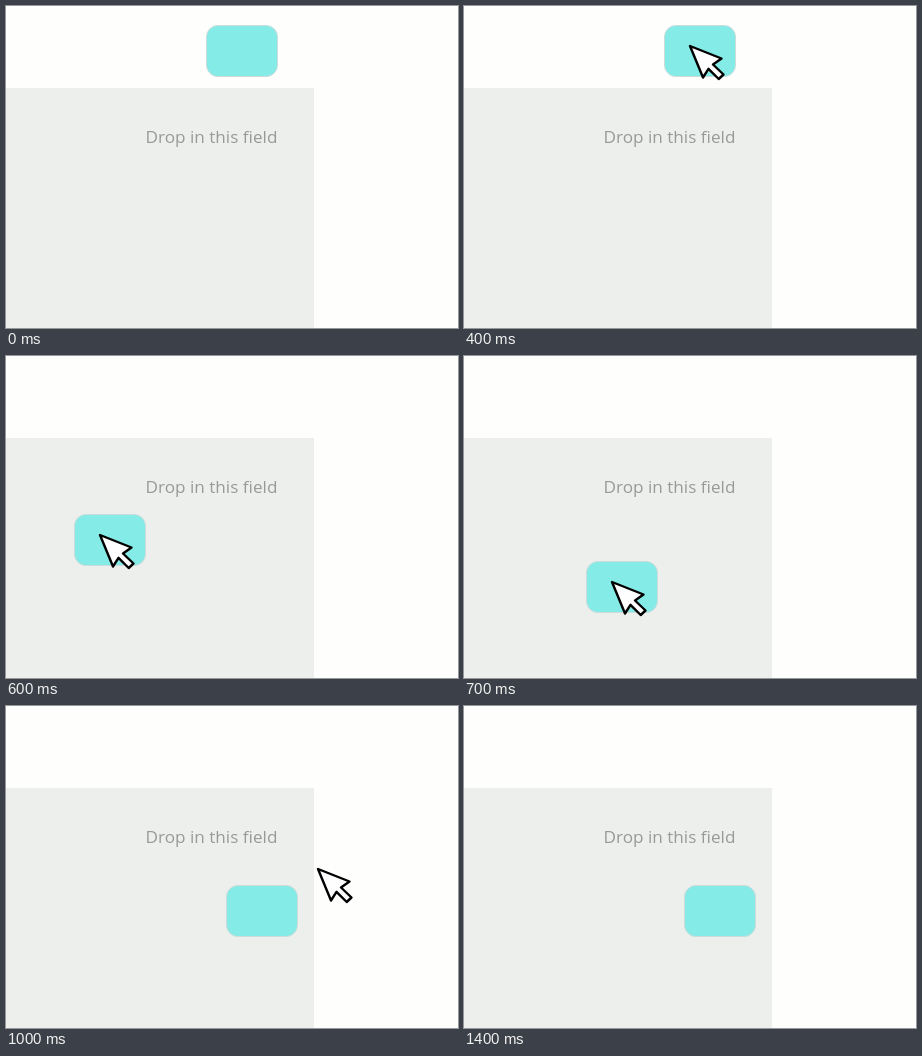
Recreate the animation shown at these times as an HTML page. Size 452 px wide and 322 px high, loop 1.9 s.

```html
<!DOCTYPE html>
<html lang="en">
<head>
<meta charset="utf-8">
<title>Drag and drop</title>
<style>
  html, body { margin: 0; width: 100%; height: 100%; overflow: hidden; background: #fefefc; }
  svg { display: block; width: 100%; height: 100%; }
  text { font: 17.15px "Open Sans", "Noto Sans", sans-serif; fill: #999; }
</style>
</head>
<body>
<svg viewBox="0 0 452 322">
  <rect y="82" width="308" height="240" fill="#edefed"/>
  <text x="139.5" y="137">Drop in this field</text>
  <rect id="card" x=".5" y=".5" width="71" height="51" rx="11.5" fill="#84ebe7" stroke="#cbdcda"/>
  <path id="cursor" d="M0 0 31.5 12.5 23 18.5 33.5 28.5 28.7 33 18.5 22.8 13 31.5Z"
        fill="#fefefe" stroke="#000" stroke-width="2.4" stroke-linejoin="round"/>
</svg>
<script>
  const STEP = 100, LOOP = 1900;
  const GRAB = [26, 21];   // pointer tip inside the held card
  const HOME = [200, 19], DROP = [220, 179];
  const GRAB_STEP = 4, DROP_STEP = 9;

  // Pointer tip at each step; null while it is off stage.
  const path = [
    null, [339, -4], [296, 16], [262, 28], [226, 40],
    [160, 110], [94, 179], [148, 226], [203, 269], [246, 200],
    [312, 163], [350, 119], [389, 75], [409, 15], null
  ];

  const card = document.getElementById("card");
  const cursor = document.getElementById("cursor");

  const place = (el, [x, y]) => el.setAttribute("transform", `translate(${x} ${y})`);

  function cardAt(i) {
    if (i <= GRAB_STEP) return HOME;
    if (i >= DROP_STEP) return DROP;
    return path[i].map((v, k) => v - GRAB[k]);
  }

  function draw(now) {
    const i = Math.min(Math.floor((now % LOOP) / STEP), path.length - 1);
    const tip = path[i];
    place(card, cardAt(i));
    cursor.style.display = tip ? "" : "none";
    if (tip) place(cursor, tip);
  }

  const start = performance.now();
  function tick() {
    draw(performance.now() - start);
    requestAnimationFrame(tick);
  }
  tick();
</script>
</body>
</html>
```
